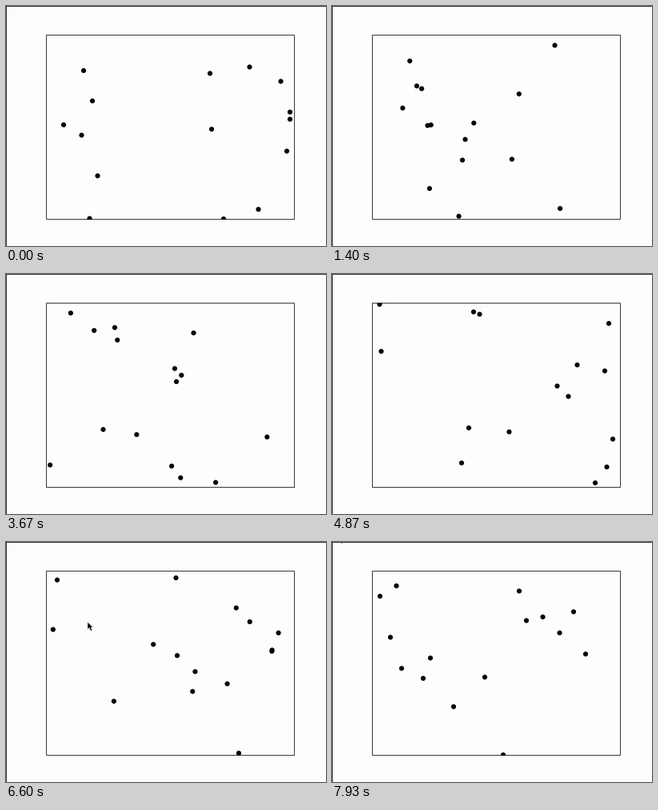
A matplotlib script for the animation above (8 s loop, 400x301 px).

```python
import numpy as np
import matplotlib.pyplot as plt
from matplotlib.animation import FuncAnimation
from matplotlib.patches import Circle, Polygon, Rectangle

W, H, DPI = 400, 301, 100
LOOP, TICK, FPS = 8000, 20, 15
INK, LINE, PAPER = "#050505", "#3a3a3a", "#fdfcfe"
X_WALLS, Y_WALLS = (51, 360), (37, 267)

# Each ball flies straight from point to point between these steps. Points past
# a wall are mirrored back into the box, so the bounces need no points.
TURNS = [0, 41, 73, 119]
FLIGHTS = [
    [(97, 81), (97.5, 57.5), (59.5, 38), (21.5, 55)],
    [(108, 119), (104, 82.5), (177, 47.5), (403, 140.5)],
    [(72, 149), (104, 108), (184.5, 50.5), (234, 12.5)],
    [(94.5, 162), (151.5, 137), (306.5, 114), (435.5, 114)],
    [(114.5, 213), (-148, 244), (-322.5, 153.5), (-427, 169.5)],
    [(104.5, 266.5), (210, 261), (329, 262), (506, 267)],
    [(255, 84.5), (-24, 122), (-272, 12), (-375, -24.5)],
    [(304.5, 76.5), (572, 23.5), (658.5, -23), (691, -45.5)],
    [(343.5, 94.5), (19, 196.5), (-69, 193), (-354.5, 94)],
    [(355, 133), (-13, 200), (-249, 327), (-576, 466)],
    [(355, 142), (101, 240), (343.5, 242), (597, 145.5)],
    [(257, 154.5), (-11.5, 145.5), (-239, 121.5), (-531, 158.5)],
    [(351, 182), (-16, 204), (-119.5, 198), (-316, 87.5)],
    [(315.5, 255), (156, -27.5), (281.5, -66.5), (568, -132.5)],
    [(272, 267), (590, 241.5), (780, 237), (732, 171)],
]

# The mouse pointer sweeps in from the right and leaves at the top left.
POINTER_STEPS = [92, 99, 105, 108]
POINTER_PATH = [(420, 280), (102, 100.5), (2, 3), (8, -9)]
ARROW = np.array([(0, 0), (0, 9), (2, 7), (4, 11), (5.6, 10.2), (4, 6.5), (6.6, 6.4)])


def along(step, steps, points):
    return [np.interp(step, steps, axis) for axis in zip(*points)]


def fold(v, walls):
    lo, hi = walls
    span = hi - lo
    return hi - abs((v - lo) % (2 * span) - span)


def ball_at(flight, step):
    x, y = along(step, TURNS, flight)
    return fold(x, X_WALLS), fold(y, Y_WALLS)


fig = plt.figure(figsize=(W / DPI, H / DPI), dpi=DPI, facecolor=PAPER)
ax = fig.add_axes([0, 0, 1, 1])
ax.set_xlim(0, W)
ax.set_ylim(H, 0)
ax.axis("off")

# Unsnapped one-pixel lines through pixel centres
pen = dict(color=LINE, lw=72 / DPI, snap=False)
ax.plot([0, W], [0.5, 0.5], **pen)
ax.plot([0.5, 0.5], [0, H], **pen)
ax.add_patch(Rectangle((50.5, 36.5), 310, 231, fill=False, **pen))

inside = Rectangle((50, 36), 311, 232, transform=ax.transData)
balls = []
for flight in FLIGHTS:
    ball = ax.add_patch(Circle(flight[0], 3.1, fc=INK, lw=0, zorder=3))
    ball.set_clip_path(inside)
    balls.append(ball)
pointer = ax.add_patch(Polygon(ARROW, fc=INK, ec="#e4e4e4", lw=0.3, zorder=4))


def draw(i):
    step = int((i * TICK + 14) * FPS / 1000)
    for ball, flight in zip(balls, FLIGHTS):
        ball.center = ball_at(flight, step)
    pointer.set_xy(ARROW + along(step, POINTER_STEPS, POINTER_PATH))
    pointer.set_visible(step >= POINTER_STEPS[0])
    return balls + [pointer]


anim = FuncAnimation(fig, draw, frames=LOOP // TICK, interval=TICK,
                     init_func=lambda: draw(0), repeat=True, repeat_delay=0, blit=False)
plt.show()
```
